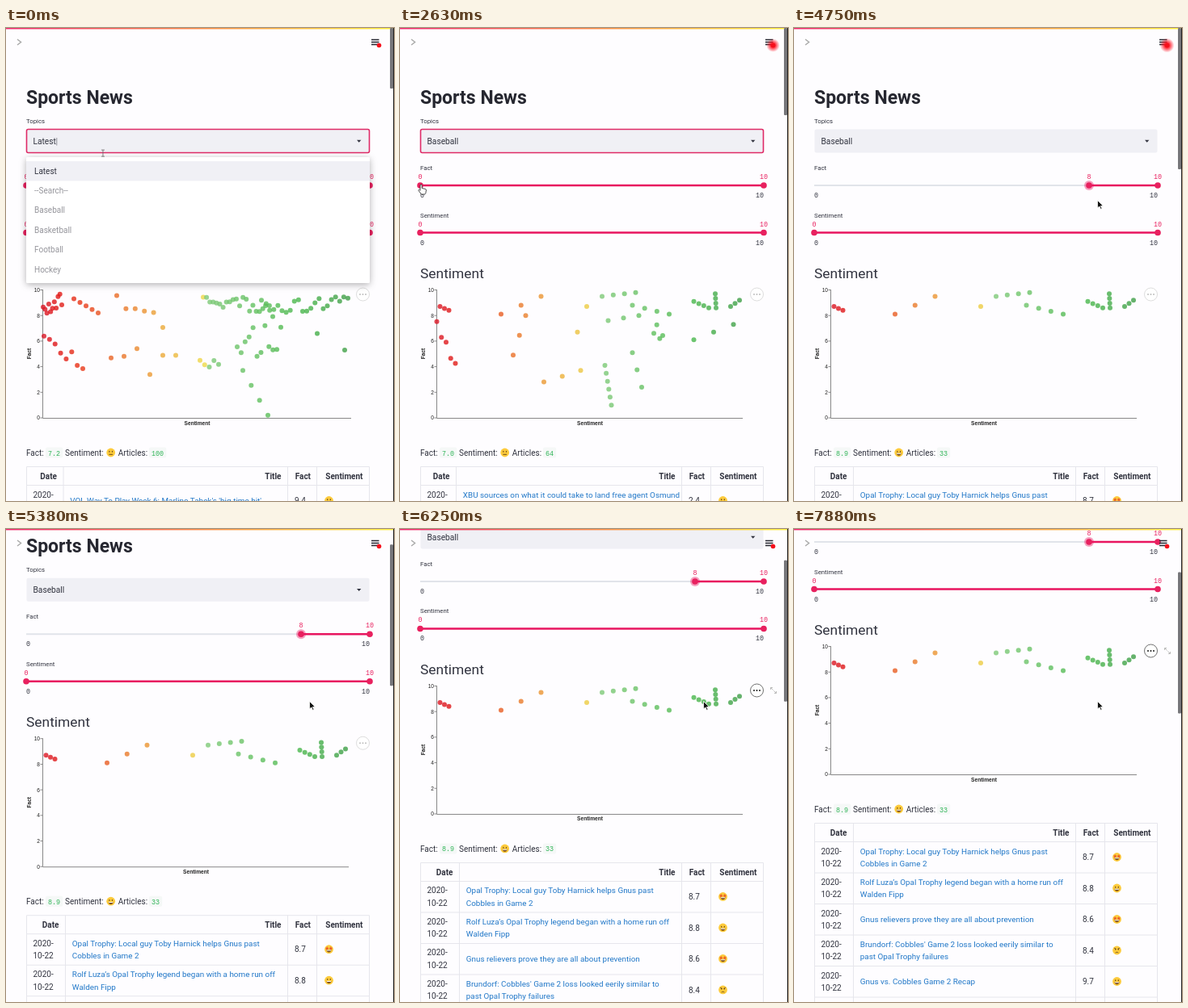
Write an HTML page that moves like this. It is 480 px wide and 586 px high and loops after 8000 ms.

```html
<!DOCTYPE html>
<html lang="en">
<head>
<meta charset="utf-8">
<title>Sports News</title>
<style>
  html, body { margin: 0; width: 100%; height: 100%; overflow: hidden; background: #fefdff; }
  svg { display: block; width: 480px; height: 586px; font: 10px Roboto, sans-serif; fill: #31333f; }
  .label { font-size: 7.8px; }
  .mono { font: 8.4px "Liberation Mono", monospace; }
  .pink { fill: #e8215f; }
  .green { fill: #2fb457; }
  .link { fill: #2278c8; font-size: 9.9px; }
  .axis { font: 6.6px "Liberation Sans", Arial, sans-serif; fill: #222; }
  .bold { font-weight: bold; }
  .end { text-anchor: end; }
  .mid { text-anchor: middle; }
  .grid { fill: none; stroke: #e6e6ec; }
  .rule { fill: none; stroke: #888; }
</style>
</head>
<body>
<svg viewBox="0 0 480 586">
  <defs>
    <linearGradient id="bar">
      <stop stop-color="#f0246b"/><stop offset=".5" stop-color="#fb8a45"/><stop offset="1" stop-color="#fdf03c"/>
    </linearGradient>
    <radialGradient id="glow">
      <stop offset=".25" stop-color="#ff1020"/><stop offset="1" stop-color="#ff1020" stop-opacity="0"/>
    </radialGradient>
    <filter id="shadow" x="-10%" y="-10%" width="120%" height="130%">
      <feDropShadow dx="0" dy="2" stdDeviation="4" flood-opacity=".3"/>
    </filter>
  </defs>

  <g id="page">
    <text x="25" y="94" font-size="23" class="bold" fill="#262730">Sports News</text>
    <text x="25" y="118" class="label">Topics</text>
    <rect id="box" x="25.5" y="125.5" width="424" height="29" rx="2" fill="#f0f0f5" stroke-width="1.6"/>
    <text x="33.5" y="143.6" font-size="10.2"><tspan id="topic"></tspan><tspan id="caret" font-weight="300">|</tspan></text>
    <path d="M434 138.8h5.4l-2.7 3z"/>
    <g id="sliders"></g>
    <text x="25" y="310" font-size="17.4">Sentiment</text>
    <g id="chart"></g>
    <g id="more">
      <circle cx="441.5" cy="330" r="8" fill="#fff"/>
      <path d="M438 330h0m3.5 0h0m3.5 0h0" stroke-width="1.9" stroke-linecap="round"/>
    </g>
    <path id="expand" fill="none" stroke="#bbb" d="M458.5 329v-2.5h2.5m-2.5 0l3 3M465.5 331v2.5h-2.5m2.5 0l-3-3"/>
    <g id="report"></g>
    <g id="menu"></g>
  </g>

  <path d="M14 14l4.5 3.5-4.5 3.5" fill="none" stroke="#aaa" stroke-width="1.5"/>
  <g id="running">
    <g fill="none" stroke="#999" stroke-width="1.3">
      <circle cx="341.5" cy="19.5" r="3.5"/><path d="M342 14.5l3-.5-2 4h3l1 4.5M338 15.5l4-1"/>
    </g>
    <circle cx="345" cy="12" r="1.3" fill="#999"/>
    <text x="354" y="20.5" font-size="8.1" fill="#a3a3aa">RUNNING...</text>
    <rect x="401.5" y="10.5" width="37" height="15" rx="2" fill="#fff" stroke="#ddd"/>
    <text x="420" y="20.8" font-size="8.3" class="mid">Stop</text>
  </g>
  <path d="M452 14.5h9.5M452 17.5h9.5M452 20.5h9.5" stroke="#262730" stroke-width="1.5"/>
  <circle id="halo" cx="461.5" cy="21.5" fill="url(#glow)"/>
  <circle cx="461.5" cy="21.5" r="2.8" fill="#f5101c"/>
  <rect width="480" height="1.4" fill="url(#bar)"/>
  <rect id="thumb" x="475" width="4" rx="1" fill="#77777b"/>
  <path d="M479.5 0v586" stroke="#222"/>
  <path id="cursor" stroke-width=".8"/>
</svg>

<script>
const LOOP = 8000;
const $ = id => document.getElementById(id);
const set = (id, attrs) => { for (const k in attrs) $(id).setAttribute(k, attrs[k]); };
const show = (id, on) => set(id, { visibility: on ? 'visible' : 'hidden' });
const text = (x, y, s, cls = '', extra = '') => `<text x="${x}" y="${y}" class="${cls}" ${extra}>${s}</text>`;
const clamp = (v, lo, hi) => Math.max(lo, Math.min(hi, v));

// Interpolates rows of [time, ...values]
function track(keys, t) {
  const i = keys.findIndex(k => k[0] > t);
  if (i < 1) return keys.at(i).slice(1);
  const a = keys[i - 1], b = keys[i], u = (t - a[0]) / (b[0] - a[0]);
  return a.slice(1).map((v, j) => v + (b[j + 1] - v) * u);
}

let seed = 7;
const noise = () => { const n = Math.sin(seed++) * 1e4; return 2 * (n - Math.floor(n)) - 1; };

// Each trail: point count, start x and score, end x and score, scatter
const scatter = trails => trails.flatMap(([n, x0, f0, x1, f1, spread = 0]) =>
  Array.from({ length: n }, (_, i) => {
    const u = i / (n - 1);
    return [x0 + (x1 - x0) * u, Math.min(98, f0 + (f1 - f0) * u + spread * noise())];
  }));
const latest = scatter([
  [11, 46, 83, 69, 93, 5], [5, 84, 93, 114, 82], [6, 137, 92, 194, 76, 6], [8, 47, 62, 95, 42, 6],
  [6, 130, 44, 210, 42, 12], [5, 240, 47, 263, 40, 4], [22, 244, 95, 330, 84, 7], [22, 316, 87, 423, 89, 6],
  [12, 286, 60, 340, 60, 14], [4, 293, 37, 324, 2], [2, 385, 66, 419, 53]
]);
const baseball = scatter([
  [3, 49.5, 87, 60.5, 84], [3, 125, 81, 174.5, 95], [2, 219.5, 67, 231, 87], [4, 250, 95, 291.5, 98],
  [4, 287.5, 88, 333, 81], [4, 363.5, 91, 382, 86], [4, 390, 97, 391, 86], [3, 409, 87, 420, 92],
  [5, 45.5, 71, 68.5, 40, 6], [3, 140, 49, 155.5, 80], [3, 178, 28, 223.5, 37], [6, 253.5, 41, 261.5, 10],
  [3, 257.5, 76, 295.5, 80], [3, 287.5, 51, 299, 24], [4, 314, 70, 325, 58, 8], [3, 363.5, 61, 412.5, 73]
]);

const views = [
  { points: latest, end: 427, fact: '7.2', count: 100, mood: 'flat', col: 71.5, bar: 75,
    rows: [['VQL Way To Play Week 6: Marlino Tabek\'s \'big-time hit\'', '', 9.4, 'flat']] },
  { points: baseball, end: 424, fact: '7.0', count: 64, mood: 'flat', col: 70, bar: 108,
    rows: [['XBU sources on what it could take to land free agent Osmund', 'Harvick', 2.4, 'flat']] },
  { points: baseball.filter(p => p[1] > 80), end: 424, fact: '8.9', count: 33, mood: 'happy', col: 74, bar: 175,
    rows: [
      ['Opal Trophy: Local guy Toby Harnick helps Gnus past', 'Cobbles in Game 2', 8.7, 'star'],
      ['Rolf Luza’s Opal Trophy legend began with a home run off', 'Walden Fipp', 8.8, 'happy'],
      ['Gnus relievers prove they are all about prevention', '', 8.6, 'star'],
      ['Brundorf: Cobbles\' Game 2 loss looked eerily similar to', 'past Opal Trophy failures', 8.4, 'angry'],
      ['Gnus vs. Cobbles Game 2 Recap', '', 9.7, 'happy']] }
];

const scoreY = f => 483 - f * 1.585;

// Red through yellow, then light to deep green
function tint(x) {
  const u = (x - 46) / 380;
  return u < .53 ? `hsl(${-5 + 110 * u} 82% ${47 + 26 * u}%)` : `hsl(${105 + 20 * u} 43% ${86 - 43 * u}%)`;
}

function chart({ points, end }) {
  const mid = (46 + end) / 2;
  let s = `<path class="rule" d="M45.5 324V483.5H${end}"/>`;
  for (let v = 0; v <= 10; v += 2) {
    const y = scoreY(v * 10);
    s += `<path class="rule" d="M42.5 ${y}h3"/>` + text(42, y + 2.4, v, 'axis end');
  }
  s += text(mid, 491.5, 'Sentiment', 'axis bold mid') +
    text(0, 0, 'Fact', 'axis bold mid', 'transform="translate(31 403.5) rotate(-90)"');
  for (const [x, f] of points)
    s += `<circle cx="${x}" cy="${scoreY(f)}" r="3" fill="${tint(x)}" opacity=".8"/>`;
  return s;
}

const star = x => `<path transform="translate(${x} -1.3)" fill="#ea5a2a" d="M0-2.3L.7-.7 2.3-.5 1.1.6 1.4 2.1 0 1.4-1.4 2.1-1.1.6-2.3-.5-.7-.7Z"/>`;
const eyes = '<path d="M-1.8-1.6v.6M1.8-1.6v.6" stroke="#6b4a1a" stroke-width="1.3" stroke-linecap="round"/>';
const grin = '<path d="M-3 .8h6q-.5 3-3 3t-3-3z" fill="#7a4a18"/><path d="M-2.6 1.3h5.2" stroke="#fff"/>';
const moods = {
  flat: eyes + '<path d="M-2.3 2.3h4.6" stroke="#6b4a1a"/>',
  happy: eyes + grin,
  star: star(-2.3) + star(2.3) + grin,
  angry: eyes + '<path d="M-3.3-2.8l2.3 1.1M3.3-2.8l-2.3 1.1M-1.8 3q1.8-1.6 3.6 0" fill="none" stroke="#6b4a1a" stroke-width=".9"/>'
};
const face = (x, y, mood) => `<g transform="translate(${x} ${y})"><circle r="5.4" fill="#fdcb3c"/>${moods[mood]}</g>`;
const chip = (x, s) => `<rect x="${x - 3}" y="519.5" width="${s.length * 5.1 + 6}" height="13" rx="2" fill="#f5f8f7"/>` +
  text(x, 529.5, s, 'mono green');

function report({ fact, count, mood, col, rows }) {
  let s = text(25, 529.6, 'Fact:') + chip(52, fact) + text(73, 529.6, 'Sentiment:') +
    face(129.7, 526, mood) + text(138.7, 529.6, 'Articles:') + chip(180, String(count));
  const heads = { Date: col - 8.5, Title: 340.5, Fact: 377, Sentiment: 441.5 };
  for (const name in heads) s += text(heads[name], 558.7, name, 'bold end');
  s += `<path class="grid" d="M25.5 800V543.5H449.5V800M${col - .5} 800V543.5M348.5 800V543.5M384.5 800V543.5"/>`;
  for (let i = 0; i < 6; i++) s += `<path class="grid" d="M25.5 ${566.5 + 38.5 * i}h424"/>`;
  rows.forEach(([one, two, score, m], i) => {
    const y = 585.5 + 38.5 * i, up = y - 4, down = y + 11.3;
    s += text(33.5, up, '2020-') + text(33.5, down, '10-22') +
      text(col + 7.8, two ? up : y + 3.6, one, 'link') + text(col + 7.8, down, two, 'link') +
      text(357, y + 3.6, score) + face(399.5, y, m);
  });
  return s;
}

function slider(name, y, low, active) {
  const x = 25 + 42.5 * low;
  return text(25, y - 19, name, 'label') +
    `<path d="M25 ${y}H${x}" stroke="#e1e4ea" stroke-width="2"/>
     <path d="M${x} ${y}H450" stroke="#e8155f" stroke-width="2.6"/>
     <circle cx="${x}" cy="${y}" r="6" fill="#e8155f" opacity="${active ? .4 : 0}"/>
     <circle cx="${x}" cy="${y}" r="3.8" class="pink"/><circle cx="450" cy="${y}" r="3.8" class="pink"/>` +
    text(x, y - 8, low, 'mono pink mid') + text(450, y - 8, 10, 'mono pink mid') +
    text(25, y + 15, 0, 'mono') + text(450, y + 15, 10, 'mono end');
}

const topics = ['Latest', '--Search--', 'Baseball', 'Basketball', 'Football', 'Hockey'];
const menu = picked => '<rect x="25" y="160" width="425" height="156" rx="2" fill="#fff" filter="url(#shadow)"/>' +
  topics.map((name, i) => {
    const y = 165 + 24.4 * i;
    return (i == picked ? `<rect x="25" y="${y}" width="425" height="24.4" fill="#f0f0f5"/>` : '') +
      text(35, y + 15.6, name, '', i == picked ? '' : 'fill="#96969c"');
  }).join('');

// Redraws a group only when its key changes
const drawn = {};
function fill(id, key, make) {
  if (drawn[id] === key) return;
  drawn[id] = key;
  $(id).innerHTML = make();
}

const cursors = {
  beam: { fill: 'none', stroke: '#666', d: 'M-2-4h4M0-4v8M-2 4h4' },
  arrow: { fill: '#111', stroke: '#fff', d: 'M0 0V9.5L2.3 7.5 4 11 5.5 10.3 3.9 7H7Z' },
  hand: { fill: '#fff', stroke: '#222',
    d: 'M2 0c1 0 1.2.6 1.2 1.2V4.5l4 .9c.9.2 1.3.8 1.2 1.6L7.8 10.5 6.8 12H2.5L-1 7.5c-.5-1 .6-1.6 1.3-.9L1 7.3V1.2C1 .5 1.3 0 2 0Z' }
};
const mouse = [[0, 120, 155], [620, 97, 220], [1200, 97, 220], [2300, 24, 194], [2900, 24, 194],
  [3600, 364, 194], [3850, 364, 194], [4300, 375.5, 213.5]];
const scrolls = [[4900, 0], [5380, 64.7], [6250, 130], [7880, 179]];

function draw() {
  const t = performance.now() % LOOP;
  const [mx, my] = track(mouse, t), [scroll] = track(scrolls, t);
  const open = t < 800, drag = t >= 2850;
  const view = t < 1500 ? 0 : t < 4150 ? 1 : 2;
  const low = drag ? clamp(Math.round((mx - 23) / 42.5), 0, 8) : 0;
  const picked = clamp(Math.floor((my - 165) / 24.4), 0, 5);
  const { bar } = views[view];

  set('page', { transform: `translate(0 ${-scroll})` });
  set('box', { stroke: drag ? 'none' : '#df2a66' });
  fill('topic', open, () => open ? 'Latest' : 'Baseball');
  show('caret', !drag && t % 1000 < 500);
  fill('sliders', low + '/' + drag, () => slider('Fact', 195, low, drag) + slider('Sentiment', 253.5, 0, false));
  fill('chart', view, () => chart(views[view]));
  fill('report', view, () => report(views[view]));
  fill('menu', open ? picked : -1, () => open ? menu(picked) : '');

  const hover = t > 4300 && my > 324 - scroll;
  set('more', { stroke: hover ? '#111' : '#bbb', 'stroke-width': hover ? .6 : .5 });
  show('expand', hover);
  show('running', t > 880 && t < 1600 || t > 3800 && t < 4200);
  set('halo', { r: 3 + 5 * Math.max(0, Math.cos(2 * Math.PI * (t / 2000 - .4)) + .2) });
  set('thumb', { y: scroll * bar / 586, height: bar });

  const shape = open && my < 160 ? 'beam' : open || t > 2200 && t < 3850 ? 'hand' : 'arrow';
  set('cursor', { ...cursors[shape], transform: `translate(${mx} ${my})` });
  requestAnimationFrame(draw);
}
draw();
</script>
</body>
</html>
```
